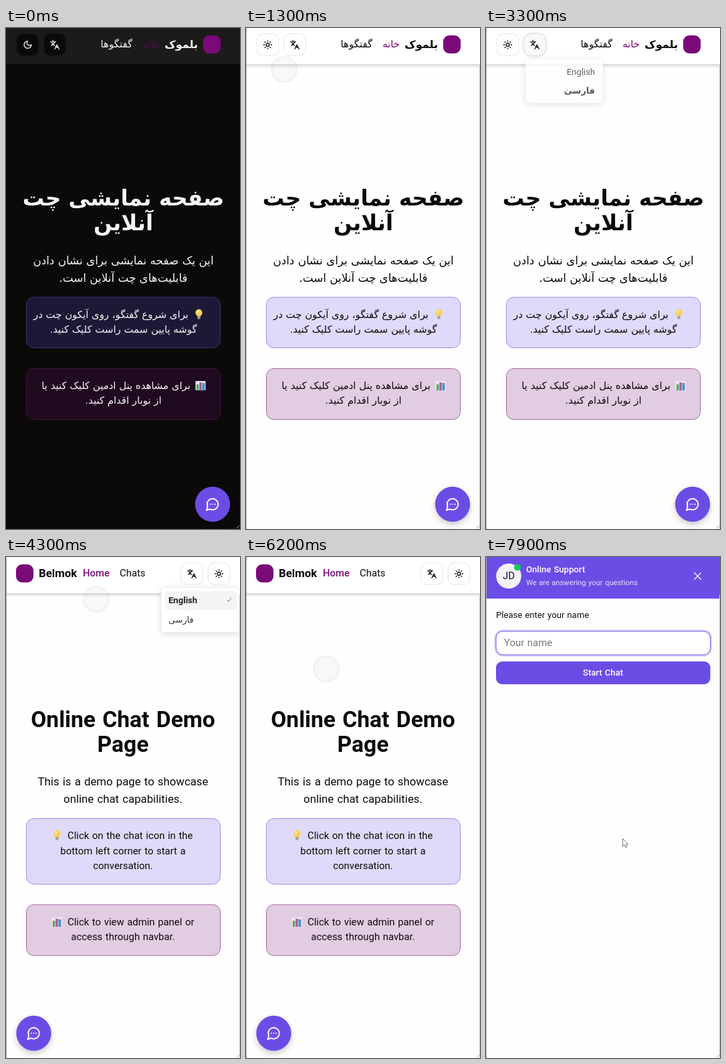
Recreate the animation shown at these times as an HTML page. Size 350 by 748 pixels, loop 8000 ms.

```html
<!DOCTYPE html>
<html lang="en">
<head>
<meta charset="utf-8">
<title>Online chat demo</title>
<style>
  html, body { margin: 0; height: 100%; overflow: hidden; background: #fefefe; }
  svg { display: block; width: 100vw; height: 100vh; }
  text { font-family: Roboto, sans-serif; word-spacing: .06em; white-space: pre; }
  text.fa { font-family: 'DejaVu Sans', sans-serif; direction: rtl; word-spacing: 0; }
  .icon { fill: none; stroke-linecap: round; stroke-linejoin: round; }
  .fab { filter: drop-shadow(0 4px 5px #0003); }
  .pop { filter: drop-shadow(0 2px 4px #0002); }
</style>
</head>
<body>
<svg id="stage" viewBox="0 0 350 748" preserveAspectRatio="none"></svg>
<script>
const PURPLE = '#6b4de6', BRAND = '#7a0a78';
const DARK = {
  bg: '#0b0a09', bar: '#1d1b1a', ink: '#f5f5f4', home: '#500a50', button: '#0b0a0a', edge: '#131211',
  tip: ['#1e1836', '#3d3476'], admin: ['#200a20', '#45123f'], paper: '#dfe6ea', themeIcon: 'moon'
};
const LIGHT = {
  bg: '#fefefe', bar: '#ffffff', ink: '#0c0a09', home: BRAND, button: '#ffffff', edge: '#e7e5e4',
  tip: ['#dfdafa', '#9b90e4'], admin: ['#e2cce2', '#a56ba5'], paper: '#efe3f0', themeIcon: 'sun'
};
const ICONS = {
  moon: 'M12 3a6 6 0 0 0 9 9 9 9 0 1 1-9-9Z',
  sun: 'M8 12a4 4 0 1 0 8 0a4 4 0 1 0-8 0M12 2v2M12 20v2M2 12h2M20 12h2M5 5l1.4 1.4M17.6 17.6l1.4 1.4M5 19l1.4-1.4M17.6 6.4l1.4-1.4',
  monitor: 'M2 4h20v13H2zM8 21h8M12 17v4',
  translate: 'M5 8l6 6M4 14l6-6 2-3M2 5h12M7 2h1M22 22l-5-10-5 10M14 18h6',
  chat: 'M7.9 20A9 9 0 1 0 4 16.1L2 22ZM8 12h.01M12 12h.01M16 12h.01',
  check: 'M5 13l4 5L19 5',
  close: 'M5 5l14 14M19 5L5 19'
};

const rect = (x, y, w, h, r, fill, stroke = 'none', extra = '') =>
  `<rect x="${x}" y="${y}" width="${w}" height="${h}" rx="${r}" fill="${fill}" stroke="${stroke}" ${extra}/>`;
const circle = (x, y, r, fill, extra = '') => `<circle cx="${x}" cy="${y}" r="${r}" fill="${fill}" ${extra}/>`;
const icon = (name, x, y, size, color, width = 2) =>
  `<path class="icon" d="${ICONS[name]}" stroke="${color}" stroke-width="${width}"
    transform="translate(${x - size / 2} ${y - size / 2}) scale(${size / 24})"/>`;
const text = (x, y, size, fill, str, { anchor = 'start', weight = 400, fa = false } = {}) =>
  `<text x="${x}" y="${y}" font-size="${size}" fill="${fill}" text-anchor="${anchor}"
    font-weight="${weight}" class="${fa ? 'fa' : ''}">${str}</text>`;
const group = (id, body) => `<g id="${id}">${body}</g>`;

const bulb = (x, y) => `<g transform="translate(${x} ${y})">
  ${circle(0, -2, 5.2, '#f7cf5b')}${circle(-1.3, -3.5, 2, '#fdeaa6')}
  <path d="M-2.6 2h5.2v2h-5.2z" fill="#e8b84a"/>${rect(-2.2, 4, 4.4, 3.4, 1, '#9aa0a8')}</g>`;
const chart = (x, y, paper) => `<g transform="translate(${x} ${y})">
  ${rect(-7.5, -7, 15, 14, 1, paper)}${rect(-6, -2, 3.4, 9, 0, '#4fae62')}
  ${rect(-1.7, -5, 3.4, 12, 0, '#b0578f')}${rect(2.6, -4, 3.6, 11, 0, '#3f8ed0')}</g>`;

function shell(c, langX, themeX, logoX, fabX) {
  const light = c === LIGHT;
  const button = (x, name, size) =>
    rect(x - 16.2, 8.8, 32.4, 32.4, 9, c.button, c.edge) + icon(name, x, 25, size, c.ink, 2.2);
  return rect(0, 0, 350, 748, 0, c.bg)
    + (light ? rect(0, 54, 350, 6, 0, 'url(#barShadow)') : '')
    + rect(0, 0, 350, 54, 0, c.bar)
    + rect(logoX, 11, 26, 27, 9, BRAND)
    + button(langX, 'translate', 15) + button(themeX, c.themeIcon, 14.5)
    + circle(fabX, 711, 26.2, PURPLE, 'class="fab"') + icon('chat', fabX, 711, 22, '#fff');
}

const cards = (c, y1, h1, y2) =>
  rect(30.5, y1, 290, h1, 11, ...c.tip) + rect(30.5, y2, 290, 76, 11, ...c.admin);

function persianPage(c) {
  const mid = { anchor: 'middle', fa: true }, right = { fa: true };
  const say = (x, y, size, str, opt) => text(x, y, size, c.ink, str, opt);
  return shell(c, 73, 32.5, 295, 309)
    + say(287, 30, 16, 'بلموک', { fa: true, weight: 700 })
    + text(230, 29, 14.9, c.home, 'خانه', right)
    + say(189, 29, 14.9, 'گفتگوها', right)
    + say(175.5, 265, 32.4, 'صفحه نمایشی چت', { ...mid, weight: 700 })
    + say(175.5, 302, 32.4, 'آنلاین', { ...mid, weight: 700 })
    + say(175.5, 353, 16.8, 'این یک صفحه نمایشی برای نشان دادن', mid)
    + say(175.5, 379, 16.8, 'قابلیت&zwnj;های چت آنلاین است.', mid)
    + cards(c, 402, 75.5, 508.5)
    + bulb(288.5, 427) + say(273, 433, 14.9, 'برای شروع گفتگو، روی آیکون چت در', right)
    + say(175.5, 455, 14.9, 'گوشه پایین سمت راست کلیک کنید.', mid)
    + chart(291, 534, c.paper) + say(276, 539, 14.9, 'برای مشاهده پنل ادمین کلیک کنید یا', right)
    + say(175.5, 561, 14.9, 'از نوبار اقدام کنید.', mid);
}

function englishPage(c) {
  const mid = { anchor: 'middle' };
  const say = (x, y, size, str, opt) => text(x, y, size, c.ink, str, opt);
  return shell(c, 278, 318.5, 15, 41.5)
    + say(49, 29.5, 16.8, 'Belmok', { weight: 700 })
    + text(115, 29, 14.9, c.home, 'Home', { weight: 500 })
    + say(170, 29, 14.9, 'Chats')
    + say(175, 253.5, 33.6, 'Online Chat Demo', { ...mid, weight: 700 })
    + say(175, 290.5, 33.6, 'Page', { ...mid, weight: 700 })
    + say(175, 341, 16.8, 'This is a demo page to showcase', mid)
    + say(175, 367, 16.8, 'online chat capabilities.', mid)
    + cards(c, 390.5, 98, 519)
    + bulb(76.5, 415) + say(92, 421, 14.9, 'Click on the chat icon in the')
    + say(175, 443.5, 14.9, 'bottom left corner to start a', mid)
    + say(175, 466, 14.9, 'conversation.', mid)
    + chart(76, 545, c.paper) + say(92, 550, 14.9, 'Click to view admin panel or')
    + say(175, 572, 14.9, 'access through navbar.', mid);
}

function themeMenu() {
  const items = [['sun', 'روشن', 65], ['moon', 'تیره', 94], ['monitor', 'سیستم', 124]];
  return rect(16, 45.5, 119, 98, 6, '#1a1918', '#2b2a29')
    + items.map(([name, label, y]) => icon(name, 116, y, 15, '#a5a3a1', 1.8)
      + text(101, y + 5, 12.8, '#e2e1e0', label, { fa: true })).join('');
}

const persianMenu = () => rect(59, 46, 116, 66, 6, '#fff', '#ededed', 'class="pop"')
  + text(163, 70, 13.1, '#333', 'English', { anchor: 'end' })
  + text(163, 98, 12.8, '#222', 'فارسی', { weight: 700, fa: true })
  + icon('check', 119, 94, 9, '#666');

const englishMenu = () => rect(232, 45.5, 118, 67, 6, '#fff', '#ededed', 'class="pop"')
  + rect(238, 51, 107, 28, 5, '#f4f4f4')
  + text(243, 69, 13.1, '#222', 'English', { weight: 700 }) + icon('check', 334, 64, 10, '#555')
  + text(243, 98, 12.8, '#333', 'فارسی', { anchor: 'end', fa: true });

const chatPanel = () => rect(0, 0, 350, 748, 0, '#fdfdfd') + rect(0, 0, 350, 62, 0, PURPLE)
  + circle(34, 28.5, 18.8, '#f3f2f8') + text(34, 32.5, 14.9, '#111', 'JD', { anchor: 'middle' })
  + circle(47, 15.5, 5, '#13c95f')
  + text(60, 23, 13.1, '#fff', 'Online Support', { weight: 500 })
  + text(60, 42, 11.2, '#e6e0fb', 'We are answering your questions')
  + icon('close', 316.5, 28.5, 17, '#f0edfd')
  + text(15, 91, 13.1, '#111', 'Please enter your name')
  + rect(15, 111, 320.5, 35, 10, '#fff', '#d4ccf8', 'stroke-width="5"')
  + rect(15, 111, 320.5, 35, 10, '#fff', '#7560e4')
  + text(27, 132.5, 14.9, '#777', 'Your name')
  + rect(15, 156, 320.5, 34, 9, PURPLE)
  + text(175, 176.5, 13.1, '#fff', 'Start Chat', { anchor: 'middle', weight: 500 });

const arrowShape = '<path d="M0 0v11.5l2.7-2.4 1.8 4.2 2-.9-1.8-4H8z" fill="#fff" stroke="#666" stroke-width=".9"/>';
const handShape = `<path d="M-1.3 9V1a1.3 1.3 0 0 1 2.6 0v5l5.5 1.2q1.6.4 1.4 2.2l-.7 4.2-1.5 3H-.5l-4.2-6.2
  q.5-1.7 2-.8z" fill="#fff" stroke="#333" stroke-width=".9"/><path d="M2 11.5v3M4.2 11.5v3" stroke="#555" stroke-width=".7"/>`;

const stage = document.getElementById('stage');
stage.innerHTML = `<defs><linearGradient id="barShadow" x2="0" y2="1">
    <stop stop-color="#000" stop-opacity=".16"/><stop offset="1" stop-color="#000" stop-opacity="0"/>
  </linearGradient></defs>`
  + group('persianDark', persianPage(DARK)) + group('persianLight', persianPage(LIGHT))
  + group('english', englishPage(LIGHT))
  + group('themes', themeMenu()) + group('languagesFa', persianMenu()) + group('languagesEn', englishMenu())
  + group('touch', circle(0, 0, 19, '#888', 'fill-opacity=".05" stroke="#888" stroke-opacity=".08" stroke-width="3"'))
  + group('panel', chatPanel())
  + group('edges', rect(0, 0, 1, 748, 0, '#a8a8a8') + rect(349, 56, 1, 692, 0, '#c4c4c4'))
  + '<path d="M345 747l4-4" stroke="#aaa"/>'
  + group('hand', handShape) + group('arrow', arrowShape);

const part = Object.fromEntries([...stage.querySelectorAll('g[id]')].map(g => [g.id, g]));
const show = (name, opacity) => {
  part[name].style.display = opacity > 0 ? '' : 'none';
  part[name].style.opacity = Number(opacity);
};
const place = (name, [x, y]) => part[name].setAttribute('transform', `translate(${x} ${y})`);
const ramp = (t, from, to) => Math.min(1, Math.max(0, (t - from) / (to - from)));

// Each move: start, end, destination
const touchMoves = [[100, 100, [32, 25]], [500, 900, [57, 62]], [2000, 2800, [73, 25]],
  [3300, 3500, [135, 63]], [6000, 6800, [41, 722]]];
const arrowMoves = [[0, 0, [41, 722]], [7600, 7900, [204.5, 420.5]]];
function along(moves, t) {
  let pos = moves[0][2];
  for (const [from, to, goal] of moves.slice(1)) {
    const p = ramp(t, from, to), eased = p * p * (3 - 2 * p);
    pos = pos.map((v, i) => v + (goal[i] - v) * eased);
  }
  return pos;
}

const LIGHT_AT = 1300, ENGLISH_AT = 4300, PANEL_AT = 7600;
function frame() {
  const t = performance.now() % 8000;
  show('persianDark', t < LIGHT_AT);
  show('persianLight', t >= LIGHT_AT && t < ENGLISH_AT);
  show('english', t >= ENGLISH_AT && t < PANEL_AT);
  show('themes', t < LIGHT_AT ? ramp(t, 300, 500) * (1 - .25 * ramp(t, 1100, 1200)) : 0);
  show('languagesFa', t < ENGLISH_AT ? ramp(t, 3050, 3380) : 0);
  show('languagesEn', t >= ENGLISH_AT ? 1 - ramp(t, 4900, 5000) : 0);
  show('touch', t >= 100 && t < 6850);
  place('touch', along(touchMoves, t));
  show('panel', t >= PANEL_AT);
  show('edges', t >= LIGHT_AT);
  show('hand', t >= 6900 && t < PANEL_AT);
  place('hand', [41.5, 723]);
  show('arrow', t >= PANEL_AT);
  place('arrow', along(arrowMoves, t));
  requestAnimationFrame(frame);
}
frame();
</script>
</body>
</html>
```
